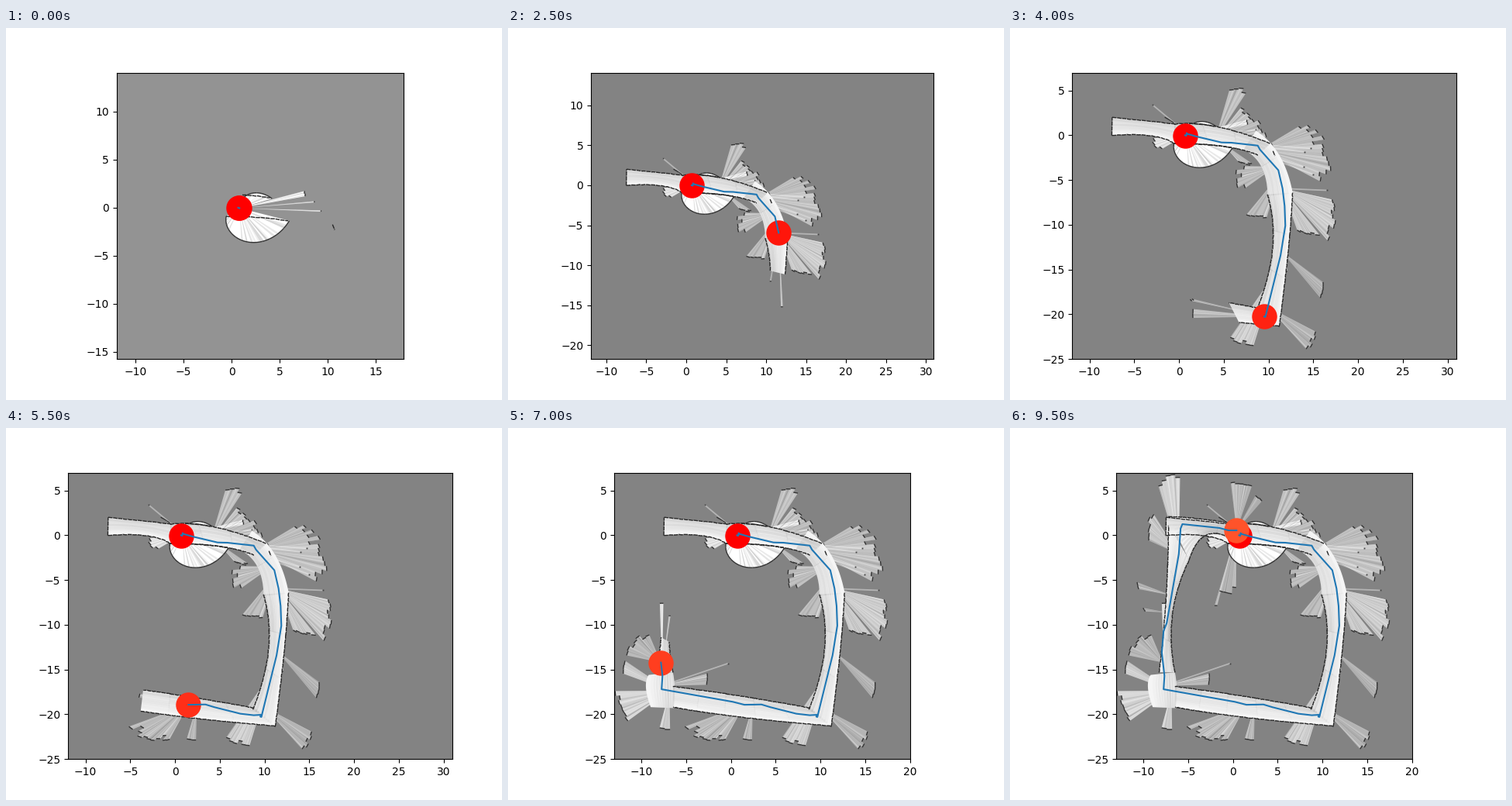
A matplotlib script for the animation above (10000 ms loop, 640 by 480 pixels).

```python
import math

import numpy as np
import matplotlib.pyplot as plt
from matplotlib.animation import FuncAnimation
from matplotlib.collections import LineCollection, PolyCollection
from matplotlib.ticker import MultipleLocator

FRAMES, INTERVAL = 20, 500
UNKNOWN = 131 / 255
rng = np.random.default_rng(4)

fig, ax = plt.subplots(figsize=(6.4, 4.8), dpi=100)
ax.set_aspect("equal")
for axis in (ax.xaxis, ax.yaxis):
    axis.set_major_locator(MultipleLocator(5))

# The map grows in steps: (first frame, x limits, y limits)
VIEWS = [
    (0, (-11.95, 17.9), (-15.75, 14.05)),
    (3, (-11.9, 23.75), (-15.75, 14.05)),
    (5, (-11.93, 30.95), (-21.75, 14.1)),
    (6, (-11.95, 30.99), (-25, 7)),
    (12, (-13.04, 20.02), (-25, 7)),
]

# Robot key poses: (time in frames, x, y)
POSES = np.array([
    (-.1, .68, 0), (0, .82, -.05), (.6, .85, .25), (1, .95, .15), (2, 2.05, -.16),
    (2.7, 4.75, -.8), (3, 5.88, -.83), (3.8, 8.8, -1.15), (4, 9.05, -1.6),
    (4.6, 11.1, -3.9), (5, 11.57, -5.95), (5.5, 11.8, -7.9), (6, 11.88, -10.1),
    (6.7, 11.35, -13.4), (7.9, 9.65, -20.3), (8, 9.53, -20.25), (8.1, 9.65, -20.05),
    (8.4, 8.8, -20.1), (9, 7.3, -19.93), (10, 4.4, -19.2), (10.4, 3.4, -18.9),
    (11, 1.5, -18.93), (11.4, .2, -18.6), (13.2, -7.75, -17.2), (13.6, -7.65, -15.7),
    (14.3, -7.95, -13.1), (14.8, -7.75, -10.7), (15, -7.4, -9.8), (17, -6.05, -2.1),
    (17.7, -5.85, .75), (17.8, -5.65, 1.25), (18.5, -1.5, .82), (18.8, -.5, .55),
    (19, .4, .55),
])


def pose(t):
    return np.array([np.interp(t, POSES[:, 0], POSES[:, k]) for k in (1, 2)])


scanned = []  # (first frame, artist)


def reveal(t, artist):
    scanned.append((math.ceil(t), artist))


def add_lines(t, lines, z, **style):
    reveal(t, ax.add_collection(LineCollection(lines, zorder=z, **style), autolim=False))


def curve(points, s):
    """Quadratic through three points at s = 0, 1/2 and 1."""
    a, b, c = np.array(points, float)
    s = np.asarray(s)[:, None]
    return a * (1 - s) * (1 - 2 * s) + b * 4 * s * (1 - s) + c * s * (2 * s - 1)


def wall(t, line):
    line = line + rng.uniform(-.03, .03, line.shape)
    add_lines(t, [line], 3, colors="0.15", linewidths=1, linestyles=[(0, (4, .6))])


def corridor(first, last, inner, outer, walls=True):
    """Bright strip between two curves, uncovered piece by piece."""
    pieces = last - first + 1
    for k in range(pieces):
        s = np.linspace(k, k + 1.02, 30) / pieces
        a, b = curve(inner, s), curve(outer, s)
        t = first + k
        reveal(t, ax.fill(*np.vstack([a, b[::-1]]).T, color="0.96", lw=0, zorder=2)[0])
        for u in np.linspace(.04, .8, 9):
            grey = str(round(rng.uniform(.5, .75), 2))
            add_lines(t, [a + (b - a) * u], 2.1, colors=grey, linewidths=2,
                      alpha=.3 * (1 - u))
        if walls:
            wall(t, a)
            wall(t, b)


def fan(t, a, b, tone=.5, rough=.06):
    """Area swept from the pose at time t, between the far corners a and b."""
    origin = pose(t)
    da, db = np.array(a) - origin, np.array(b) - origin
    ta, tb = math.atan2(*da[::-1]), math.atan2(*db[::-1])
    turn = (tb - ta + math.pi) % math.tau - math.pi
    blocks = max(2, round(np.hypot(*(db - da)) / .5))
    rays_per_block = 5
    s = np.repeat(np.arange(blocks), rays_per_block) + np.tile(np.linspace(0, 1, rays_per_block), blocks)
    s /= blocks
    depth = np.repeat(1 - rough * rng.random(blocks) ** 1.5, rays_per_block)
    radius = (np.hypot(*da) * (1 - s) + np.hypot(*db) * s) * depth
    angle = ta + turn * s
    rim = origin + radius[:, None] * np.stack([np.cos(angle), np.sin(angle)], 1)

    reveal(t, ax.fill(*np.vstack([origin, rim]).T, color=(1, 1, 1, tone), lw=0, zorder=1)[0])
    streaks, colors = [], []
    for i in rng.integers(0, len(rim) - 2, blocks * 4):
        streaks.append([origin, rim[i], rim[i + 1]])
        light = rng.choice([1, UNKNOWN])
        colors.append((light, light, light, rng.uniform(.05, .35)))
    reveal(t, ax.add_collection(PolyCollection(
        streaks, facecolors=colors, linewidths=0, zorder=1.2), autolim=False))
    add_lines(t, rim.reshape(blocks, rays_per_block, 2), 1.5, colors="0.2", linewidths=1)


def ray(t, x, y):
    add_lines(t, [[pose(t), (x, y)]], 1.1, colors="w", linewidths=1.3, alpha=.4)
    reveal(t, ax.plot(x, y, "s", color="0.25", ms=1.3, mew=0, zorder=1.6)[0])


# First scan
fan(0, (7.7, 1.77), (7.7, 1.2), 1, .02)
fan(0, (8.6, .68), (8.6, .54), .75, 0)
fan(0, (9.3, -.28), (9.3, -.42), .75, 0)
fan(0, (1.3, 1.1), (4.2, .95), 1, 0)
fan(0, (-.55, -.88), (6, -1.36), 1, 0)
north_side = [(-.5, 1.25), (4.3, .95), (10.1, -.9)]
south_side = [(-.6, -.9), (5, -1.25), (8.8, -2.2)]
wall(0, curve(north_side, np.linspace(.18, .47, 20)))
wall(0, curve(south_side, np.linspace(0, .6, 20)))
wall(0, np.array([(10.5, -1.75), (10.75, -2.3)]))

# West room, first corridor and junction
corridor(1, 1, [(-7.45, 2), (-4, 1.65), (-.5, 1.25)], [(-7.5, 0), (-3.2, -.05), (-.6, -.9)])
wall(1, np.array([(-7.5, 0), (-7.45, 2)]))
fan(1, (-3.4, -.4), (-2.2, -1.7), .8, .15)
fan(1, (-1.7, 2.1), (-.6, 1.4), .7)
ray(1, -2.95, 3.4)
corridor(1, 3, north_side, south_side)
fan(2.5, (5.7, 5.3), (7.8, 5.2), .5, .12)
fan(2.5, (7, 3.2), (9.8, -.2), .5, .12)
fan(2.7, (8.5, -3.4), (6.6, -2.9), .5, .2)
fan(2.7, (10.5, -.9), (11, -2.4), .6)
for tip in [(14.7, -1.45), (14, -1.85), (14.95, -4.35), (13.9, -3.55)]:
    ray(2.9, *tip)
fan(4, (14.4, 1.6), (17, -5.8), .5, .2)
corridor(4, 5, [(7.2, -1.6), (9.2, -3.5), (9.9, -6.7)],
         [(8.6, .5), (11.2, -2.2), (12.7, -6.4)], walls=False)
fan(4.5, (6.5, -3.4), (6.7, -6.4), .5, .2)
fan(4.7, (7.5, -8.9), (9.8, -9.2), .5)

# East corridor
fan(5, (17.2, -7.2), (16.8, -12), .62, .12)
fan(5, (16, -11.5), (13.2, -10.6), .6, .1)
fan(5, (11.85, -15.2), (12.1, -15.2), .5, 0)
fan(5, (10.45, -12), (10.65, -12), .4, 0)
ray(5, 16.5, -6.15)
corridor(5, 7, [(9.9, -6.6), (10.45, -12.7), (8.75, -19.35)],
         [(12.7, -6.4), (12.15, -13.5), (11.2, -21.3)])
fan(6.6, (16.1, -16.4), (15.9, -18.3), .4)
fan(7, (5.5, -22.9), (8.3, -23.6), .65)
fan(7.7, (15.4, -22), (14.4, -24.1), .4)
fan(8, (1, -18.15), (1.4, -18.5), .4)
fan(8, (1.55, -19.4), (1.55, -20.4), .45)

# South corridor
corridor(8, 12, [(8.85, -19.3), (1, -17.95), (-6.4, -16.9)],
         [(11.2, -21.3), (1, -20.3), (-6.4, -19.2)])
fan(10.7, (1.3, -22.8), (2.35, -22.9), .4)
fan(11, (-5.2, -17.4), (-5.45, -18.5), .4, .3)
fan(11, (-5.8, -21.6), (-.6, -22.8), .45, .25)

# South-west corner
fan(13, (-12, -13.9), (-12.2, -15.4), .6)
fan(13, (-12.95, -17.4), (-11.6, -20.8), .7, .15)
fan(13, (-8, -21.6), (-6.8, -21.7), .6)
corridor(13, 13, [(-6.5, -15.3), (-6.3, -17), (-6.4, -19.2)],
         [(-9.2, -15.6), (-9.5, -17), (-9, -19.1)], walls=False)
fan(13.3, (-2.6, -15.4), (-2.6, -16.7), .45)
ray(13.3, -.3, -14.3)
fan(14, (-11.75, -13.4), (-9.3, -10.7), .45, .15)
fan(13.7, (-7.95, -7.6), (-7.55, -7.6), .8, 0)
fan(13.7, (-6.95, -9), (-6.75, -9), .6, 0)

# West corridor
corridor(14, 17, [(-6.5, -15.3), (-6.75, -8.8), (-4.9, -2.8)],
         [(-8.25, -15.3), (-7.5, -7.5), (-7.2, 1)])
fan(15.3, (-10.1, -8.1), (-9.9, -8.5), .4)
fan(15.8, (-10.8, -5.2), (-10.6, -6), .4)

# North-west corner and the way home
fan(17, (-9.8, -.4), (-9, 2.6), .55, .15)
fan(17, (-8.6, 6.4), (-5.9, 6.8), .65, .12)
corridor(17, 19, [(-4.9, -2.8), (-2.8, .1), (.5, -.9)], [(-7.2, 2.1), (-3, 1.75), (.8, 1.15)])
fan(19, (-.25, 5.9), (2.2, 5.75), .4, .08)
fan(19, (2.6, 4.6), (3.3, 3.9), .35)
fan(19, (-2.05, -7.85), (-1.75, -7.85), .4, 0)
fan(19, (-1.5, -6.2), (.35, -6.6), .38, .12)

ax.scatter(.72, -.05, s=500, color="red", zorder=4)
robot = ax.scatter(0, 0, s=500, zorder=4.5)
trail, = ax.plot([], [], color="C0", lw=1.5, zorder=5)


def draw(i):
    _, xlim, ylim = [view for view in VIEWS if view[0] <= i][-1]
    ax.set(xlim=xlim, ylim=ylim)
    ax.set_facecolor(str(147 / 255 if i < 3 else UNKNOWN))
    for start, artist in scanned:
        artist.set_visible(start <= i)
    path = np.vstack([POSES[POSES[:, 0] < i, 1:], pose(i)])
    trail.set_data(*path.T)
    robot.set_offsets([path[-1]])
    robot.set_color([plt.cm.rainbow(1 - .0056 * i)])


anim = FuncAnimation(fig, draw, frames=FRAMES, interval=INTERVAL, repeat=True)
plt.show()
```
